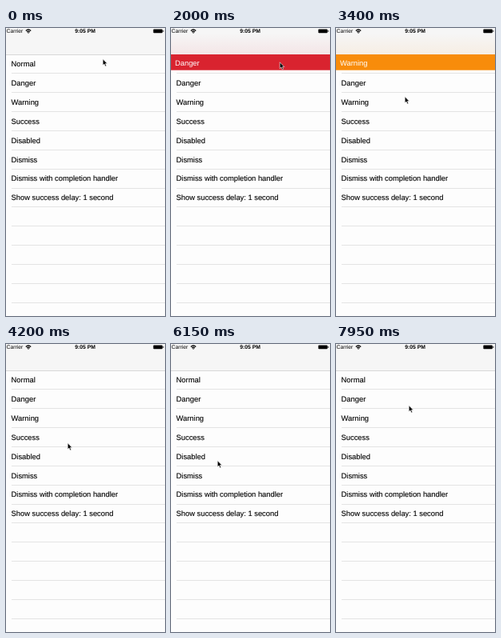
Animation, 199 px wide and 360 px high, one loop 8 s. Source, as an HTML page:

```html
<!DOCTYPE html>
<html lang="en">
<head>
<meta charset="utf-8">
<title>Notification banners</title>
<style>
  html, body { margin: 0; width: 100%; height: 100%; overflow: hidden; background: #fdfdfd; }
  svg { display: block; width: 199px; height: 360px; }
  text { font-family: "Liberation Sans", Arial, sans-serif; font-size: 9.35px; text-rendering: geometricPrecision; }
  .row { fill: #000; stroke: #000; stroke-width: .12px; }
  .status { font-size: 6.8px; fill: #000; }
</style>
</head>
<body>
<svg viewBox="0 0 199 360">
  <defs>
    <clipPath id="below"><rect y="33" width="199" height="327"/></clipPath>
    <linearGradient id="fade" x1="0" y1="0" x2="0" y2="1">
      <stop id="tintTop" offset=".2" stop-opacity="0"/>
      <stop id="tintEnd" offset="1" stop-opacity=".08"/>
    </linearGradient>
  </defs>
  <rect width="199" height="360" fill="#fdfdfd"/>
  <g id="table"></g>
  <g clip-path="url(#below)">
    <g id="banner">
      <rect y="33" width="199" height="19.7"/>
      <text id="label" x="5" y="46.6" fill="#fff"></text>
    </g>
  </g>
  <rect width="199" height="33" fill="#f6f6f6"/>
  <rect id="tint" width="199" height="33" fill="url(#fade)"/>
  <rect id="edge" y="33" width="199" height="1" fill="#d8d8d8"/>
  <text class="status" x=".5" y="6.3">Carrier</text>
  <g fill="none" stroke="#000" stroke-width="1.3">
    <path d="M24.8 3.4Q28 .6 31.2 3.4M26.2 4.9Q28 3.4 29.8 4.9"/>
    <path d="M26.9 5.6L28 6.9L29.1 5.6Z" fill="#000" stroke="none"/>
  </g>
  <text class="status" x="99" y="6.4" text-anchor="middle" font-weight="bold">9:05 PM</text>
  <rect x="184.4" y="1.6" width="11.4" height="4.6" rx=".8"/>
  <rect x="196.3" y="3" width="1" height="1.8" rx=".4"/>
  <path id="cursor" d="M0 0V7.8L1.8 6.2L3 9.1L4.4 8.5L3.2 5.8H5.6Z" stroke="#fff" stroke-width=".6"/>
</svg>
<script>
const LOOP = 8000, STEP = 50, GLIDE = 250, ROW = 23.86, TOP = 33;
const $ = id => document.getElementById(id);
const clamp = v => Math.max(0, Math.min(1, v));
const easeOut = v => 1 - (1 - v) ** 2;
const easeInOut = v => v * v * (3 - 2 * v);

const rows = ["Normal", "Danger", "Warning", "Success", "Disabled", "Dismiss",
  "Dismiss with completion handler", "Show success delay: 1 second"];

// The first rows each open a banner
const banners = [
  { color: "#969696", enter: 300, leave: 1200 },
  { color: "#d9232f", enter: 1600, leave: 2250 },
  { color: "#f88c0b", enter: 2750, leave: 3650 },
  { color: "#0cb4ec", enter: 4500, leave: 5400 },
  { color: "#a3a3a3", enter: 6200, leave: 7200 }
];

// Pointer stops: arrival time, x, y
const stops = [
  [850, 166, 41], [1400, 140, 64], [1950, 136, 43], [2650, 86, 86],
  [3650, 106, 42], [4200, 77, 124], [5000, 112, 2], [5350, 112, 42],
  [6050, 58, 146], [6600, 115, 66], [7000, 133, 44], [7550, 72, 161],
  [7950, 91, 77]
];

function buildTable() {
  let out = "";
  for (let i = 0; i < 13; i++) {
    const y = TOP + i * ROW;
    if (rows[i]) out += `<text class="row" x="6.6" y="${y + 15.2}">${rows[i]}</text>`;
    out += `<rect x="7" y="${Math.floor(y + ROW)}" width="192" height="1" fill="#e4e4e4"/>`;
  }
  $("table").innerHTML = out;
}

function pointerAt(t) {
  let x = 121, y = 39;
  for (const [arrive, toX, toY] of stops) {
    const k = easeInOut(clamp((t - arrive) / GLIDE + 1));
    x += (toX - x) * k;
    y += (toY - y) * k;
  }
  return [x + 0.2, y - 0.2];
}

function draw(t) {
  let shown = 0;
  banners.forEach(({ color, enter, leave }, i) => {
    if (t < enter || t > leave + 200) return;
    shown = t < leave
      ? easeOut(clamp((t - enter + STEP) / 250))
      : 1 - easeInOut(clamp((t - leave + STEP) / 200));
    $("label").textContent = rows[i];
    $("banner").setAttribute("fill", color);
    $("tintTop").setAttribute("stop-color", color);
    $("tintEnd").setAttribute("stop-color", color);
  });
  $("banner").setAttribute("visibility", shown ? "visible" : "hidden");
  $("banner").setAttribute("transform", `translate(0 ${-20 * (1 - shown)})`);
  $("tint").setAttribute("opacity", shown);
  $("edge").setAttribute("opacity", 1 - shown);
  $("cursor").setAttribute("transform", `translate(${pointerAt(t)})`);
}

buildTable();
const born = performance.now();
function tick() {
  const t = (performance.now() - born) % LOOP;
  draw(Math.floor(t / STEP) * STEP);
  requestAnimationFrame(tick);
}
tick();
</script>
</body>
</html>
```
